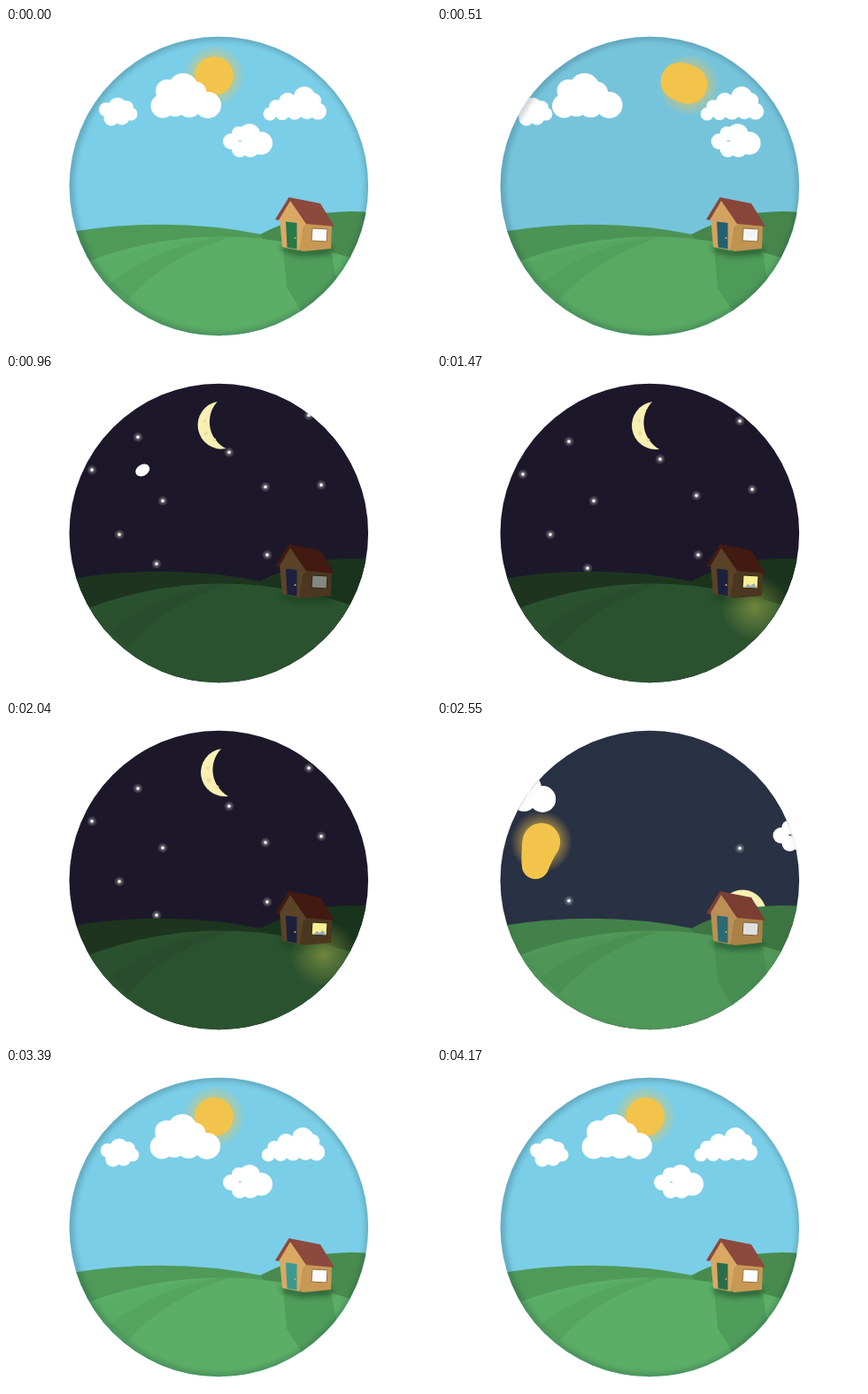
Recreate the animation shown at these times as an HTML page. Size 480 by 360 pixels, loop 4200 ms.

```html
<!DOCTYPE html>
<html>
<head>
<meta charset="utf-8">
<style>
html, body { margin: 0; width: 100%; height: 100%; overflow: hidden; background: #fff; }
svg { display: block; width: 100vw; height: 100vh; }
</style>
</head>
<body>
<svg viewBox="0 0 480 360">
  <defs>
    <clipPath id="disc"><circle cx="240.3" cy="178.5" r="168.8"/></clipPath>
    <filter id="soft" x="-50%" y="-50%" width="200%" height="200%"><feGaussianBlur stdDeviation="3"/></filter>
    <radialGradient id="sunGlow">
      <stop offset=".5" stop-color="#f3c44b" stop-opacity=".6"/>
      <stop offset="1" stop-color="#f3c44b" stop-opacity="0"/>
    </radialGradient>
    <radialGradient id="lampGlow">
      <stop offset="0" stop-color="#a9b04a" stop-opacity=".55"/>
      <stop offset="1" stop-color="#a9b04a" stop-opacity="0"/>
    </radialGradient>
    <radialGradient id="starGlow">
      <stop offset="0" stop-color="#fff" stop-opacity=".5"/>
      <stop offset="1" stop-color="#fff" stop-opacity="0"/>
    </radialGradient>
  </defs>
  <g clip-path="url(#disc)">
    <rect id="sky" width="480" height="360"/>
    <g id="stars"></g>
    <ellipse id="comet" rx="8.5" ry="6.3" fill="#fff"/>
    <g id="moon">
      <path d="M0-27A27 27 0 0 0 0 27A34 34 0 0 1 0-27Z" fill="#f8f0b3"/>
      <g fill="#ece29f"><circle cx="-19" cy="6" r="2.5"/><circle cx="-18" cy="-8" r="2"/><circle cx="-11" cy="15" r="2"/></g>
    </g>
    <g id="sun"></g>
    <g id="clouds" fill="#fff"></g>

    <path id="hillLeft" d="M60 232Q180 211 289 233L330 250V300H60Z"/>
    <path id="hillRight" d="M287 233Q350 200 420 209V300H330Z"/>
    <path id="field" d="M60 277Q150 235 245 235.500Q330 236 420 270V360H60Z"/>
    <g id="bands">
      <path d="M232 236Q160 245 95 267L118 289Q170 251 236 236Z" opacity=".35"/>
      <path d="M238 236Q165 250 117 289L138 307Q178 260 252 236Z"/>
    </g>
    <path id="longShadow" d="M313 249L317 293L334 320L385 300L372 279L367 250Z"/>
    <path d="M310 246L333 251L369 247L367 255L333 257L313 252Z" fill="#163a1c" opacity=".65" filter="url(#soft)"/>
    <circle id="lamp" cx="359" cy="262" r="38" fill="url(#lampGlow)"/>

    <path id="side" d="M338 219L368 222L367 249L336 252L330 250Z"/>
    <path id="front" d="M321 194L339 221L336 225L331 251L312 247L309 214Z"/>
    <path id="roof" d="M319.500 191L355 198L371 224L339 221L321 195L308 217L304 216Z"/>
    <path id="door" d="M316 218.500L328.500 220L328.500 249.500L317.500 247.500Z"/>
    <circle cx="326.500" cy="237" r="1" fill="#d8b25c"/>
    <path id="pane" d="M346 226L363 227L362 241L345 240Z" stroke-width="1"/>
    <path id="sill" d="M347 240L351 236L354 238L358 235L361 240Z" fill="#9aa9b4"/>
    <circle id="rim" cx="241.500" cy="178.500" r="169" fill="none" stroke="#16333f" stroke-width="6" filter="url(#soft)"/>
  </g>
</svg>
<script>
const LOOP = 4200;
const $ = id => document.getElementById(id);
const clamp = v => Math.max(0, Math.min(1, v));
const ramp = (t, start, length) => clamp((t - start) / length);
const smooth = u => u * u * (3 - 2 * u);
const since = (t, start) => Math.max(0, t - start);

function add(parent, name, attrs) {
  const el = document.createElementNS('http://www.w3.org/2000/svg', name);
  for (const key in attrs) el.setAttribute(key, attrs[key]);
  return parent.appendChild(el);
}

function mix(a, b, u) {
  const part = (hex, i) => parseInt(hex.slice(1 + 2 * i, 3 + 2 * i), 16);
  return `rgb(${[0, 1, 2].map(i => Math.round(part(a, i) + (part(b, i) - part(a, i)) * u))})`;
}

function keyed(keys, t) {
  const i = keys.findIndex(k => k[0] > t);
  const [t0, a] = keys[i - 1], [t1, b] = keys[i];
  return mix(a, b, (t - t0) / (t1 - t0));
}

// x, resting y, arrival time, departure time
const stars = [
  [149, 75, 1058, 2254], [97, 112, 1058, 2120], [128, 180, 960, 2110], [170, 218, 1058, 2100],
  [177, 142, 960, 2130], [252, 95, 1074, 2120], [293, 136, 1083, 2130], [356, 129, 1058, 2110],
  [295, 203, 960, 2100], [342, 52, 1068, 2300]
].map(([x, y, arrive, leave]) => {
  const el = add($('stars'), 'g', {});
  add(el, 'circle', { r: 6, fill: 'url(#starGlow)' });
  add(el, 'circle', { r: 1.8, fill: '#fffdf0' });
  return { el, x, y, arrive, leave };
});

// puffs are x, y, r
const clouds = [
  { leave: 344, side: -1, enter: 2450, from: 200, drift: -1,
    puffs: [[177,88,13.5],[182,71,13],[200,68,17],[214,73,12.5],[228,87,15],[191,88,12],[207,87,14]] },
  { leave: 388, side: -1, enter: 2550, from: 90, drift: 2,
    puffs: [[113,92,8],[126,89,10.5],[119,102,8.5],[136,90,8],[141,97,7.5],[131,101,8.5]] },
  { leave: 434, side: 1, enter: 2560, from: 110, drift: -2,
    puffs: [[298,97,7.5],[305,89,8],[318,83,10],[337,78,12],[347,82,9],[352.5,94,9.5],[340,94,9],[326,94,9.5],[312,96,8]] },
  { leave: 279, side: 1, enter: 2500, from: 180, drift: 0,
    puffs: [[254,128,9],[263,119,8],[275,120,12],[288,130,13],[264,137,9],[276,136,10]] }
];
for (const c of clouds) {
  c.el = add($('clouds'), 'g', {});
  c.puffs.forEach(([cx, cy, r]) => add(c.el, 'circle', { cx, cy, r }));
}

const glow = add($('sun'), 'circle', { r: 35, fill: 'url(#sunGlow)' });
const sunParts = Array.from({ length: 12 }, () => add($('sun'), 'circle', { fill: '#f3c44b' }));

// Both bodies swing on a circle: decelerating in, accelerating out.
const swingIn = (t, end) => -9.45e-7 * since(end, t) ** 3;
const swingOut = (t, start) => 5.04e-4 * since(t, start) ** 2;
const sunAngle = t => t < 1500 ? swingOut(t, 297) : Math.max(-125, swingIn(t, 2970));
const moonAngle = t => 7.2 + Math.max(-150, swingIn(t, 1082)) + Math.min(170, swingOut(t, 2100));
const onCircle = (cx, cy, r, deg) => {
  const a = deg * Math.PI / 180;
  return [cx + r * Math.sin(a), cy - r * Math.cos(a)];
};

// id: [day, night]
const groundColors = {
  hillLeft: ['#4f9a59', '#1d351f'], hillRight: ['#498b4f', '#1a331d'], field: ['#5cae66', '#2b522f'],
  bands: ['#55a55f', '#294d2c'], longShadow: ['#509d5b', '#2b522f'],
  side: ['#c89954', '#4b371f'], front: ['#dba864', '#5a4327'], roof: ['#8c493e', '#421a12']
};
const doorKeys = [[0, '#257a48'], [510, '#25606f'], [880, '#1c2240'], [2250, '#1b213b'],
  [2550, '#2c6a73'], [3390, '#3a9a90'], [4170, '#2e6c49'], [LOOP + 1, '#257a48']];

function draw(t) {
  const dusk = smooth(ramp(t, 450, 420));
  const skyNight = t < 1500 ? dusk : 1 - smooth(ramp(t, 2450, 435));
  const landNight = t < 1500 ? dusk : 1 - smooth(ramp(t, 2300, 370));
  $('sky').setAttribute('fill', mix('#7bcee7', '#1c182a', skyNight));
  for (const id in groundColors) $(id).setAttribute('fill', mix(...groundColors[id], landNight));
  $('longShadow').setAttribute('opacity', 1 - landNight);
  $('door').setAttribute('fill', keyed(doorKeys, t));
  $('rim').setAttribute('opacity', .3 * (1 - skyNight));

  const lit = ramp(t, 1200, 120) * (1 - ramp(t, 2170, 120));
  $('pane').setAttribute('fill', lit ? mix('#858880', '#f7ef91', lit) : mix('#fbfcff', '#858880', landNight));
  $('pane').setAttribute('stroke', mix('#98703c', '#302517', landNight));
  $('lamp').setAttribute('opacity', lit);
  $('sill').setAttribute('opacity', lit);

  const sunUp = t < 1000 || t > 2440;
  $('sun').setAttribute('visibility', sunUp ? 'visible' : 'hidden');
  const shrink = t > 2440 ? 6 * smooth(ramp(2800, t, 250)) : 0;
  sunParts.forEach((el, i) => {
    const lag = i / (sunParts.length - 1);
    const [x, y] = onCircle(235, 179, 125, sunAngle(t - 24 * lag));
    el.setAttribute('cx', x);
    el.setAttribute('cy', y);
    el.setAttribute('r', 21.3 - shrink * lag);
    if (!i) {
      glow.setAttribute('cx', x);
      glow.setAttribute('cy', y);
    }
  });

  const angle = moonAngle(t);
  const [mx, my] = onCircle(232, 176, 120, angle);
  $('moon').setAttribute('transform', `translate(${mx} ${my}) rotate(${angle - 15.8})`);
  $('moon').setAttribute('visibility', t > 560 && t < 2800 ? 'visible' : 'hidden');

  for (const s of stars) {
    const rise = 230 * (since(s.arrive, t) / 350) ** 3;
    const fall = 230 * (since(t, s.leave) / 400) ** 2;
    s.el.setAttribute('transform', `translate(${s.x} ${s.y - rise + fall})`);
    s.el.setAttribute('visibility', t > 560 && t < 2900 ? 'visible' : 'hidden');
  }

  const flight = (t - 960) / 80;
  $('comet').setAttribute('transform', `translate(${155 - 62 * flight} ${107 + 38 * flight}) rotate(-30)`);
  $('comet').setAttribute('opacity', clamp(1.6 - Math.abs(flight)));

  for (const c of clouds) {
    const away = t < 1500
      ? 1.2e-3 * since(t, c.leave) ** 2
      : c.from * (1 - ramp(t, c.enter, 550)) ** 3;
    const settle = c.drift * Math.sin(Math.PI * ramp(t, 3000, 1100));
    c.el.setAttribute('transform', `translate(${c.side * away + settle} 0)`);
    c.el.setAttribute('visibility', t < 1000 || t > c.enter ? 'visible' : 'hidden');
  }
}

function tick() {
  draw(performance.now() % LOOP);
  requestAnimationFrame(tick);
}
tick();
</script>
</body>
</html>
```
